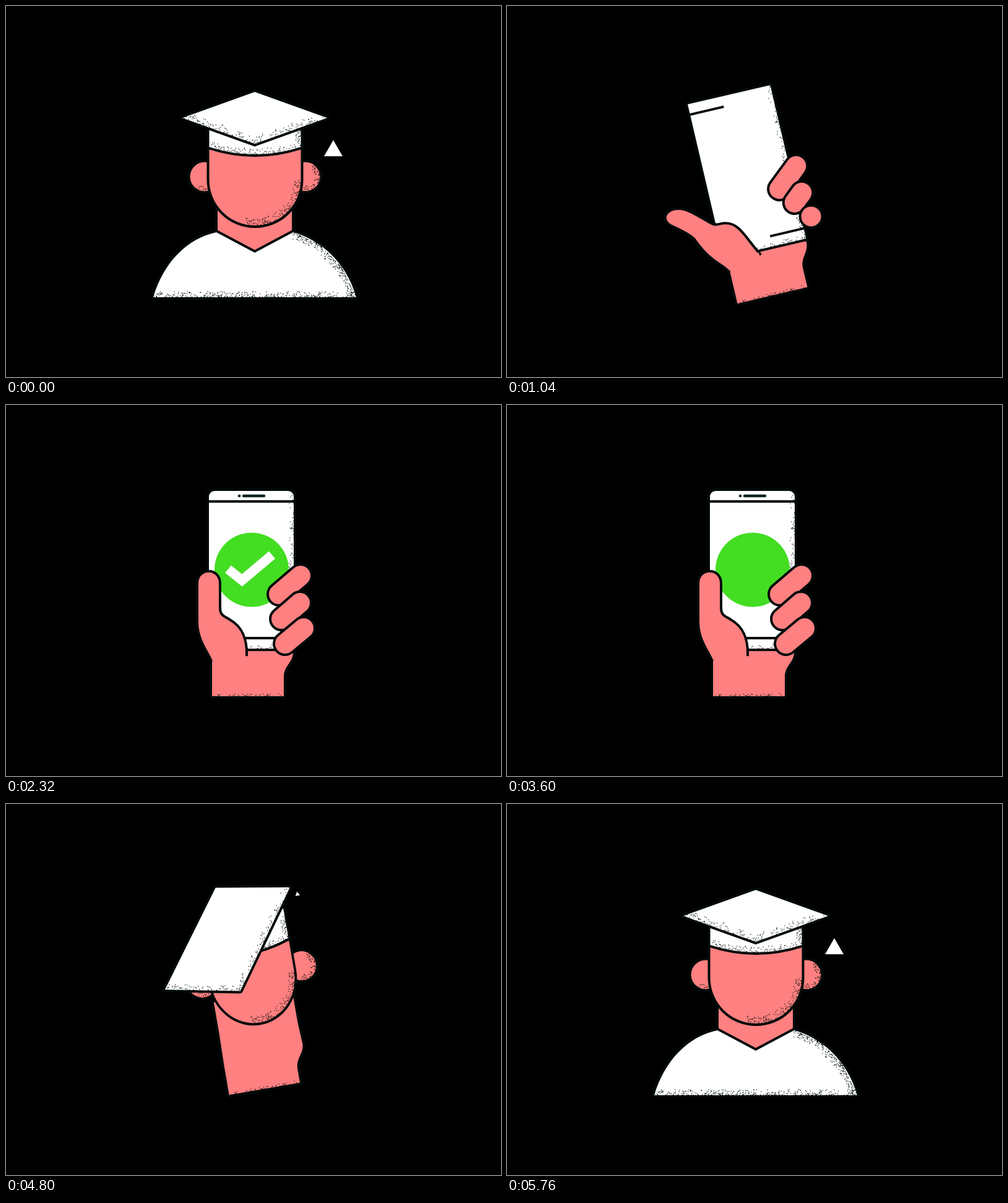
An HTML page with a canvas that plays this animation: 800x600 px, repeating every 5.84 s.

```html
<!DOCTYPE html>
<html>
<head>
<meta charset="utf-8">
<style>
html, body { margin: 0; width: 100%; height: 100%; overflow: hidden; background: #000; }
canvas { display: block; }
</style>
</head>
<body>
<canvas id="stage" width="800" height="600"></canvas>
<script>
const ctx = document.getElementById('stage').getContext('2d');
const LOOP = 5840, STEP = 80;
const SKIN = '#ff8080', INK = '#020a0a', GREEN = '#43dd22', WHITE = '#fff';
const PIVOT = [397, 305];

const lerp = (a, b, p) => a + (b - a) * p;
const mix = (a, b, p) => a.map((v, i) => lerp(v, b[i], p));
const linear = (t, a, b) => Math.min(1, Math.max(0, (t - a) / (b - a)));
const ramp = (t, a, b) => { const p = linear(t, a, b); return p * p * (3 - 2 * p); };
const backIn = p => p * p * (2.9 * p - 1.9);
const backOut = p => 1 - backIn(1 - p);

const SWING = [[0, 0], [400, 5.5], [1020, -13.2], [1680, 5.5], [2140, 0],
  [3760, 0], [4160, 6], [4580, -15], [5240, 5], [5640, 0]];
function swing(t) {
  const i = SWING.findIndex(key => key[0] > t);
  if (i < 0) return 0;
  const [[t0, a], [t1, b]] = [SWING[i - 1], SWING[i]];
  return lerp(a, b, ramp(t, t0, t1));
}

// Board corners: top-left, top-right, bottom-right, bottom-left
const PHONE = [328, 139, 465, 139, 465, 394, 328, 394];
const CAP = [402, 139, 519, 181, 402, 223, 285, 181];
const SKEW = [2, -11, -6, -13, -53, -6, -46, -7];

// Start point followed by cubic segments
const THUMB_OPEN = [334, 418, 322, 398, 308, 396, 290, 352, 284, 342, 268, 330, 258, 322,
  244, 308, 260, 296, 279, 303, 292, 308, 308, 326, 322, 338,
  328, 343, 336, 340, 343, 342, 364, 346, 368, 371, 386, 404];
const THUMB_GRIP = [334, 414, 328, 398, 311, 380, 311, 350, 311, 330, 311, 310, 311, 288,
  311, 265, 344, 265, 344, 288, 344, 300, 344, 312, 344, 328,
  344, 342, 352, 343, 361, 349, 380, 360, 388, 378, 387, 406];
const FINGERS = [[476, 276, 441, 306], [475, 320, 445, 346], [481, 361, 451, 386]];

const BODY = 'M238 471C255 414 293 376 340 366L402 399L464 366C508 378 550 414 566 471Z';
const BODY_EDGE = [464, 366, 505, 385, 540, 420, 566, 471, 238, 471];

function arc(cx, cy, r, from, to) {
  const pts = [];
  for (let i = 0; i <= 8; i++) {
    const a = lerp(from, to, i / 8);
    pts.push(cx + r * Math.cos(a), cy + r * Math.sin(a));
  }
  return pts;
}

// Stipple fading inward from a clockwise edge
function grain(edge, count, depth) {
  let seed = 7;
  const random = () => (seed = seed * 16807 % 2147483647) / 2147483647;
  random();
  let total = 0;
  const parts = [];
  for (let i = 0; i + 3 < edge.length; i += 2) {
    const [x, y, x2, y2] = edge.slice(i, i + 4);
    const len = Math.hypot(x2 - x, y2 - y);
    parts.push([x, y, (x2 - x) / len, (y2 - y) / len, len]);
    total += len;
  }
  ctx.fillStyle = INK;
  for (const [x, y, dx, dy, len] of parts) {
    for (let n = count * len / total; n > 0; n--) {
      const along = random() * len, inward = depth * random() ** 3;
      ctx.fillRect(x + dx * along - dy * inward, y + dy * along + dx * inward, 1.2, 1.2);
    }
  }
}

// Outline sits outside the fill
function shape(path, fill, edge, count, depth) {
  ctx.strokeStyle = INK;
  ctx.lineWidth = 8;
  ctx.stroke(path);
  ctx.fillStyle = fill;
  ctx.fill(path);
  if (!edge) return;
  ctx.save();
  ctx.clip(path);
  grain(edge, count, depth);
  ctx.restore();
}

function line(x, y, x2, y2, width, color = INK, cap = 'butt') {
  ctx.lineCap = cap;
  ctx.lineWidth = width;
  ctx.strokeStyle = color;
  ctx.beginPath();
  ctx.moveTo(x, y);
  ctx.lineTo(x2, y2);
  ctx.stroke();
  ctx.lineCap = 'butt';
}

function scaled(x, y, sx, sy, draw) {
  if (sx <= 0) return;
  ctx.save();
  ctx.translate(x, y);
  ctx.scale(sx, sy);
  ctx.translate(-x, -y);
  draw();
  ctx.restore();
}

function drawArm(k) {
  const left = 342 - 8 * ramp(k, 400, 700);
  const base = 462 + 9 * ramp(k, 700, 950);
  shape(new Path2D(`M${left} 310V364L333 414V${base}H449V440C449 422 462 418 464 402L462 364V310Z`),
    SKIN, [449, base, 333, base], 70, 5);
}

function drawHead(k) {
  const ear = 1 - ramp(k, 710, 850);
  for (const x of [321, 484]) {
    scaled(x, 276, ear, ear, () => {
      const path = new Path2D();
      path.arc(x, 276, 23.5, 0, 7);
      shape(path, SKIN, x > 400 ? arc(x, 276, 23.5, -1, 1.8) : arc(x, 276, 23.5, 1.2, 2.2), x > 400 ? 80 : 15, 9);
    });
  }
  scaled(402.5, 276, 1 - .14 * ramp(k, 450, 900), 1, () => {
    shape(new Path2D('M328.5 215V281A74 74 0 0 0 476.5 281V215Z'), SKIN, arc(402.5, 281, 74, 0, 1.8), 190, 12);
    shape(new Path2D('M328.5 180H476.5V228Q402.5 252 328.5 228Z'), WHITE,
      [476, 190, 476, 228, 440, 238, 402, 240, 365, 238, 329, 228], 200, 10);
  });
}

function drawBoard(k) {
  const m = ramp(k, 540, 860);
  const p = mix(CAP, PHONE, m).map((v, i) => v + SKEW[i] * 4 * m * (1 - m));
  const round = 9 * ramp(k, 1060, 1200);
  const path = new Path2D();
  path.moveTo(p[6], p[7]);
  path.arcTo(p[0], p[1], p[2], p[3], round);
  path.arcTo(p[2], p[3], p[4], p[5], round);
  path.lineTo(p[4], p[5]);
  path.closePath();
  shape(path, WHITE, p.slice(2), 230, lerp(12, 8, m));

  const rule = linear(k, 950, 1170);
  if (rule) {
    line(327, 156, lerp(327, 466, rule), 156, 4);
    line(466, 377, lerp(466, 327, rule), 377, 4);
  }
  const speaker = ramp(k, 1120, 1240);
  scaled(397, 147, speaker, speaker, () => {
    line(377, 147, 377.01, 147, 4.6, '#0c2424', 'round');
    line(384, 147, 417, 147, 4.4, '#0c2424', 'round');
  });

  const tassel = 1 - ramp(k, 480, 800);
  const x = p[2] + 10, y = p[3] + 49 * tassel;
  scaled(x, y, tassel, tassel, () => {
    ctx.fillStyle = WHITE;
    ctx.fill(new Path2D(`M${x} ${y - 13}l15 26h-30Z`));
  });
}

function drawBadge(t) {
  const size = t < 3000 ? backOut(linear(t, 1400, 1720)) : 1 - backIn(linear(t, 3640, 4000));
  scaled(397, 266.5, size, size, () => {
    ctx.fillStyle = GREEN;
    ctx.beginPath();
    ctx.arc(397, 266.5, 60, 0, 7);
    ctx.fill();
  });
  const drawn = ramp(t, 1720, 2120);
  const tick = 1 - backIn(linear(t, 2920, 3320));
  if (!drawn) return;
  scaled(395, 265, tick, tick, () => {
    ctx.lineWidth = 15.5;
    ctx.strokeStyle = WHITE;
    ctx.lineJoin = 'miter';
    ctx.setLineDash([93 * drawn, 200]);
    ctx.stroke(new Path2D('M359 265.5L381.5 283.5L430 242.5'));
    ctx.setLineDash([]);
  });
}

function drawHand(k) {
  const size = ramp(k, 820, 1000);
  const q = mix(THUMB_OPEN, THUMB_GRIP, ramp(k, 1040, 1220));
  scaled(362, 405, size, size, () => {
    const path = new Path2D();
    path.moveTo(q[0], q[1]);
    for (let i = 2; i < q.length; i += 6) path.bezierCurveTo(...q.slice(i, i + 6));
    shape(path, SKIN);
    // Blend the thumb root into the palm
    ctx.fillStyle = SKIN;
    ctx.fill(new Path2D(`M${q[0]} ${q[1]}L${q[36] - 1} ${q[37] - 6}L387 418L334 424Z`));
  });

  FINGERS.forEach(([x, y, x2, y2], i) => {
    const start = 880 + 80 * i;
    const r = 16 * ramp(k, start - 120, start);
    if (!r) return;
    const reach = ramp(k, start, start + 160);
    const end = [lerp(x, x2, reach) + .01, lerp(y, y2, reach)];
    line(x, y, ...end, 2 * r + 8, INK, 'round');
    line(x, y, ...end, 2 * r, SKIN, 'round');
  });
}

function draw(t) {
  // Morph clock: runs forward into the phone, then back to the graduate
  const k = t < 3000 ? t : 1400 - 1.1 * (t - 4160);
  ctx.fillStyle = '#000';
  ctx.fillRect(0, 0, 800, 600);
  ctx.save();
  ctx.lineJoin = 'round';
  ctx.translate(...PIVOT);
  ctx.rotate(swing(t) * Math.PI / 180);
  ctx.translate(-PIVOT[0], -PIVOT[1]);

  drawArm(k);
  const body = 1 - ramp(k, 360, 640);
  scaled(402, 440, body, body, () => shape(new Path2D(BODY), WHITE, BODY_EDGE, 750, 10));
  if (k < 880) drawHead(k);
  drawBoard(k);
  drawBadge(t);
  drawHand(k);
  ctx.restore();
}

const start = performance.now();
function tick() {
  const t = (performance.now() - start) % LOOP;
  draw(Math.floor(t / STEP) * STEP);
  requestAnimationFrame(tick);
}
tick();
</script>
</body>
</html>
```
